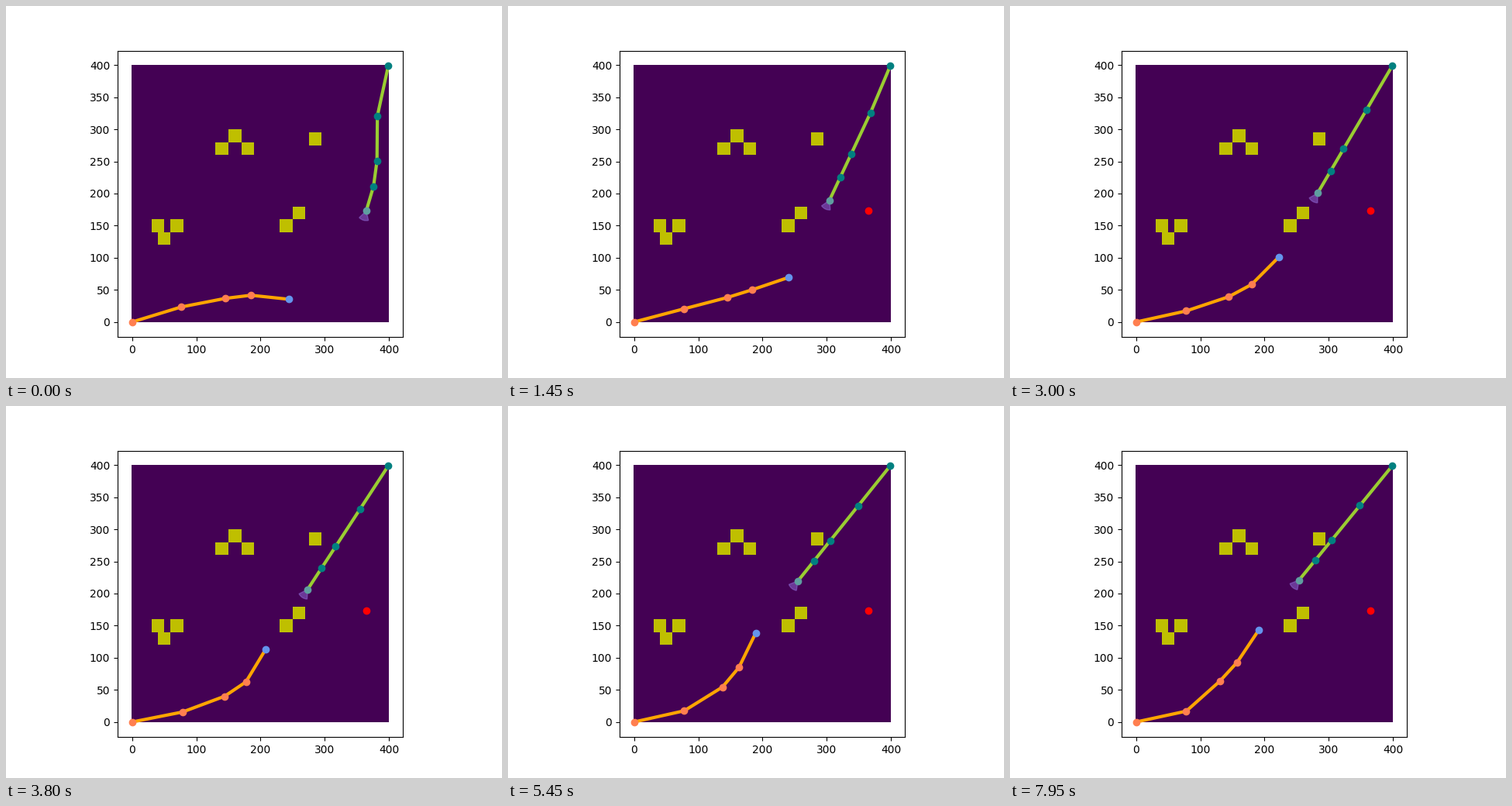
A matplotlib script for the animation above (8000 ms loop, 640 px wide and 480 px high).

```python
import numpy as np
import matplotlib.pyplot as plt
from matplotlib.animation import FuncAnimation
from matplotlib.patches import Rectangle, Wedge

FRAMES, STEP = 160, 50
SIZE, SIDE = 400, 20
OBSTACLES = [(40, 150), (50, 130), (70, 150), (140, 270), (160, 290),
             (180, 270), (285, 285), (240, 150), (260, 170)]

LOW_LINKS = [80, 70, 40, 60]
HIGH_LINKS = [80, 70, 40, 40]


def low_angles(t):
    """The lower arm turns at a steady rate from one pose to the next."""
    times = [0, 3.8, 5.45, 6.85, 7.95]
    poses = [(17, 11, 7, -6), (11.2, 20.5, 33.9, 58.8), (12.6, 31.8, 50, 64),
             (13.5, 40, 52, 61), (12.2, 41.8, 47.4, 56.2)]
    return np.array([np.interp(t, times, link) for link in zip(*poses)])


def high_angles(t):
    """The upper arm straightens out, then swings as one rod until it rests."""
    swing = min(20.2 + 3.4 * t, 39.2)
    bend = np.array([-7.9, -19.7, -12.4, -3.7])
    settle = np.array([1.3, 0.5, 0.5, 0.5])
    return 270 - swing - bend * np.exp(-(t / settle) ** 2)


class Arm:
    def __init__(self, ax, base, links, angles, line, joint, tip):
        self.base, self.links, self.angles = base, links, angles
        self.line, = ax.plot([], [], color=line, lw=3)
        self.joints, = ax.plot([], [], "o", color=joint)
        self.tip, = ax.plot([], [], "o", color=tip)

    def move(self, t):
        angles = self.angles(t)
        rad = np.radians(angles)
        x = self.base + np.r_[0, np.cumsum(self.links * np.cos(rad))]
        y = self.base + np.r_[0, np.cumsum(self.links * np.sin(rad))]
        self.line.set_data(x, y)
        self.joints.set_data(x[:-1], y[:-1])
        self.tip.set_data(x[-1:], y[-1:])
        return (x[-1], y[-1]), angles[-1]


fig, ax = plt.subplots(figsize=(6.4, 4.8), dpi=100)
ax.imshow(np.zeros((SIZE, SIZE)), cmap="viridis", vmin=0, vmax=1,
          origin="lower")
for cx, cy in OBSTACLES:
    ax.add_patch(Rectangle((cx - SIDE / 2, cy - SIDE / 2), SIDE, SIDE,
                           facecolor="y", edgecolor="none"))
start, = ax.plot([365], [173], "o", color="red")
low = Arm(ax, 0, LOW_LINKS, low_angles, "orange", "coral", "cornflowerblue")
high = Arm(ax, SIZE - 1, HIGH_LINKS, high_angles,
           "yellowgreen", "teal", "cadetblue")
view = ax.add_patch(Wedge((0, 0), 15, 0, 60, color="mediumpurple", alpha=0.5))
ax.set_xlim(-22.5, 421.5)
ax.set_ylim(-23.5, 422.5)
ax.set_xticks(range(0, 401, 100))
ax.set_yticks(range(0, 401, 50))


def update(i):
    t = i * STEP / 1000
    low.move(t)
    tip, heading = high.move(t)
    view.set_center(tip)
    view.set_theta1(heading - 30)
    view.set_theta2(heading + 30)
    start.set_visible(i > 0)
    return []


anim = FuncAnimation(fig, update, frames=FRAMES, interval=STEP,
                     repeat=True, repeat_delay=0, blit=False)
plt.show()
```
